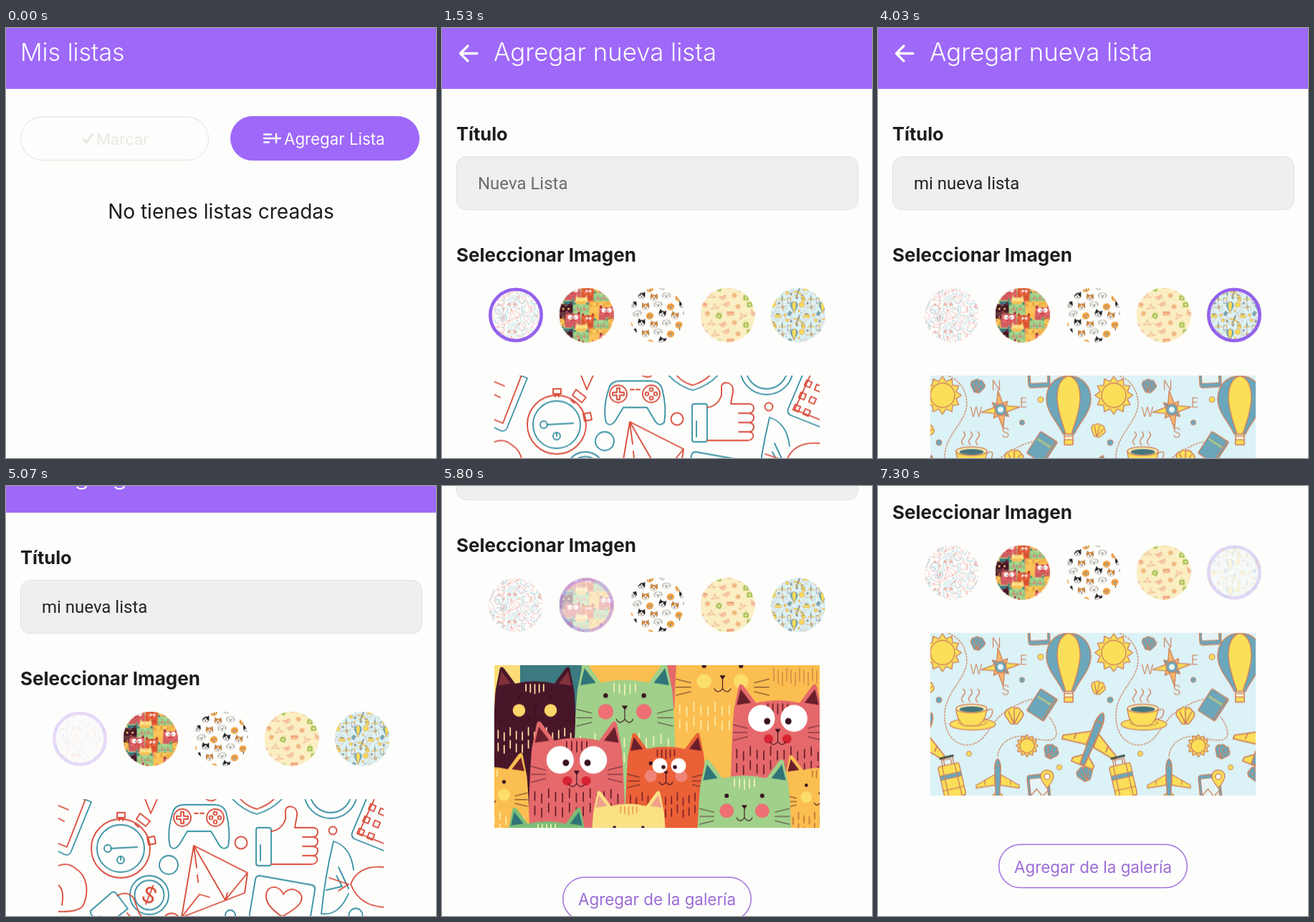
These frames come from a looping animation (600x600 px, 7.33 s). An HTML page with a canvas:

```html
<!DOCTYPE html>
<html lang="es">
<head>
<meta charset="utf-8">
<title>Mis listas</title>
<style>
html, body { margin: 0; width: 100%; height: 100%; overflow: hidden; background: #fdfdfc; }
canvas { display: block; width: 600px; height: 600px; }
</style>
</head>
<body>
<canvas id="stage" width="600" height="600"></canvas>
<script>
const LOOP = 7330, W = 454, H = 227;
const PAGE = '#fdfdfc', PURPLE = '#9e68f9', INK = '#1c1c1c';
const SANS = 'Inter, sans-serif', FIELD = 'Roboto, sans-serif';
const screen2d = document.getElementById('stage').getContext('2d');
let g = screen2d;

// ---------- helpers ----------
const clamp = v => Math.max(0, Math.min(1, v));
function paint(fill, line, w = 1.6, shape) {
  if (fill) { g.fillStyle = fill; shape ? g.fill(shape) : g.fill(); }
  if (line) { g.strokeStyle = line; g.lineWidth = w; shape ? g.stroke(shape) : g.stroke(); }
}
const path = (d, fill, line, w) => paint(fill, line, w, new Path2D(d));
function dot(x, y, r, fill, line, w) {
  g.beginPath(); g.arc(x, y, r, 0, 7); paint(fill, line, w);
}
function oval(x, y, rx, ry, fill, line, w) {
  g.beginPath(); g.ellipse(x, y, rx, ry, 0, 0, 7); paint(fill, line, w);
}
function box(x, y, w, h, r, fill, line, lw) {
  g.beginPath(); g.roundRect(x, y, w, h, r); paint(fill, line, lw);
}
function text(s, x, y, size, color, weight = 400, family = SANS, align = 'left') {
  g.font = `${weight} ${size}px ${family}`;
  g.textAlign = align;
  g.fillStyle = color;
  g.fillText(s, x, y);
}
function at(x, y, turn, draw, scale = 1) {
  g.save(); g.translate(x, y); g.rotate(turn * Math.PI / 180); g.scale(scale, scale);
  draw(); g.restore();
}

// ---------- gadgets ----------
function gadgets() {
  const O = '#d94a38', T = '#3590a2', w = 1.8;
  const o = d => path(d, null, O, w), t = d => path(d, null, T, w);
  const ring = (x, y, r, col) => dot(x, y, r, null, col, w);
  g.fillStyle = PAGE; g.fillRect(0, 0, W, H);
  // tablet, pen
  t('M30 -2L46 4L18 73Q15 80 8 77L0 73');
  o('M38 0L12 67L0 62M0 9L14 15M0 27L8 31M121 0L129 20L138 0');
  // stopwatch
  ring(87, 69, 41, O); ring(87, 69, 33, T); ring(69, 69, 5, T); ring(87, 85, 5, T);
  t('M73 69L110 67M87 80V85'); o('M82 19H93V26H82ZM85 26V30M90 26V30');
  o('M114 20L128 31L122 38L109 28ZM107 35L112 39M124 54L134 52L136 62L126 64Z');
  // controller
  t('M156 66Q151 46 160 18Q163 8 176 8H218Q230 8 234 18Q241 46 237 66Q229 74 222 60L213 45H180L171 60Q163 74 156 66Z');
  ring(173, 26, 12, O); ring(219, 26, 12, O);
  o('M171 18H175V24H181V28H175V34H171V28H165V24H171ZM190 20H195M198 20H203M206 0Q214 5 220 0');
  for (let i = 0; i < 4; i++) ring(219 + 6 * Math.cos(i * 1.57), 26 + 6 * Math.sin(i * 1.57), 2.4, O);
  // badge, globe
  t('M243 0Q258 16 277 21Q298 15 312 0'); o('M254 0Q264 11 277 14Q292 9 301 0');
  ring(380, -10, 37, T); ring(380, -10, 29, T);
  // thumb up
  box(276, 40, 21, 53, 3, null, T, w); t('M282 64V86');
  o('M297 45Q312 43 317 28V15Q319 9 327 11Q334 14 333 23L330 40H356Q363 41 362 47Q361 53 355 53H341M355 53Q363 54 362 60Q361 66 355 66H341M355 66Q363 67 362 73Q361 79 355 79H341M355 79Q363 80 361 86Q359 91 353 91H297');
  // calculator
  t('M432 -5L410 47Q408 53 414 56L454 72');
  o('M441 0L419 48L454 62');
  for (let i = 0; i < 6; i++) at(438 - (i >> 1) * 8 + (i & 1) * 14, 12 + (i >> 1) * 17 + (i & 1) * 6, 23, () => box(-4, -4, 8, 8, 0, null, O, w));
  // loose bubbles
  ring(255, 61, 8.5, O); ring(154, 92, 13, T); ring(383, 44, 5.5, O); ring(158, 172, 12.5, O);
  ring(240, 162, 7, T); ring(294, 198, 16, O); ring(415, 162, 9.5, T);
  // gem
  o('M189 65L264 103L260 131L172 165ZM189 65L233 141L264 103M233 141L236 131M172 165L197 133L211 137M189 65L193 96M194 106L195 116');
  // coin
  ring(127, 134, 27, T); ring(127, 134, 20.5, T);
  at(127, 134, 22, () => text('$', 0, 11, 31, O, 400, SANS, 'center'));
  // speech bubble with heart
  t('M281 107L354 120Q359 121 358 127L350 176Q349 181 343 180L335 197L322 176L271 167Q266 165 267 160L275 112Q276 107 281 107Z');
  o('M312 164Q288 148 290 133Q292 122 303 123Q311 125 314 133Q321 123 331 127Q342 132 339 142Q336 151 312 164Z');
  // head, hand
  o('M0 93Q14 88 24 97Q36 104 39 120Q41 134 35 148Q29 158 0 157M0 120Q9 128 5 148');
  t('M45 156L74 131Q78 128 81 132L97 153L67 177Q62 180 59 176L45 160Z'); ring(57, 167, 3, T);
  o('M82 135Q96 127 105 138L113 160Q120 166 113 171Q102 168 96 159M68 177Q82 190 100 191L134 207Q140 205 134 198L117 184L136 194Q141 192 136 185L114 166');
  // bow tie, globe edge
  t('M384 59Q372 108 367 160Q391 164 405 132M384 59Q408 66 412 99M391 95L405 125M374 127L396 122L388 107');
  o('M454 95Q418 92 408 119Q420 149 454 151M378 110L405 119L391 128');
  // crosshairs, target, star
  for (const x of [10, 464]) {
    ring(x, 203, 36, T); ring(x, 203, 27, T);
    path(`M${x} 165V195M${x} 211V230M${x - 38} 203H${x - 10}M${x + 10} 203H${x + 38}M${x - 4} 176H${x + 4}M${x - 4} 183H${x + 4}M${x - 4} 190H${x + 4}`, null, O, w);
  }
  ring(209, 231, 53, T); ring(209, 231, 39, T); ring(209, 231, 24, T);
  o('M207 229L263 181M247 193L248 181L260 173V183L268 184L258 194L247 193');
  o('M366 170L388 183L416 174L409 198L430 218L404 220L392 245L379 222L351 215L372 196Z');
  o('M54 222L74 209L118 219M77 213L86 227'); ring(75, 207, 3, O); box(121, 217, 17, 20, 2, null, T, w);
  t('M293 227V222H300V227M309 227V221H316V227M324 227V223H331');
}

// ---------- cats ----------
function cat(x0, x1, top, col, y, face, tick = '#fff0b0', ear = '#6a1f2c') {
  const w = x1 - x0, e = w * .22, m = (x0 + x1) / 2, k = w / 135;
  const X = f => x0 + f * w, Y = f => top + f * e;
  path(`M${X(-.02)} 400Q${X(0)} ${Y(3)} ${X(.04)} ${Y(1.25)}L${X(.09)} ${Y(.1)}Q${X(.11)} ${Y(-.1)} ${X(.15)} ${Y(.15)}L${X(.27)} ${Y(.9)}Q${m} ${Y(.65)} ${X(.73)} ${Y(.9)}L${X(.85)} ${Y(.15)}Q${X(.89)} ${Y(-.1)} ${X(.91)} ${Y(.1)}L${X(.96)} ${Y(1.25)}Q${X(1)} ${Y(3)} ${X(1.02)} 400Z`, col);
  for (const s of [0, 1]) {
    const F = f => X(s ? 1 - f : f);
    path(`M${F(.07)} ${Y(1)}L${F(.11)} ${Y(.25)}L${F(.22)} ${Y(.9)}Z`, ear);
  }
  let d = '';
  for (let i = -2; i < 3; i++) d += `M${m + i * 7 * k} ${Y(.95)}v${(14 - Math.abs(i) * 2) * k}`;
  for (let i = 0; i < 26; i++) {
    const u = i % 13, low = i > 12;
    d += `M${X(.07 + u * .071)} ${y + (low ? 62 : 42) * k + Math.sin(u * 2.2) * 4}v${12 * k}`;
  }
  path(d, null, tick, 1.8);
  const dark = '#3a1220';
  if (face === 'big') {
    for (const s of [-1, 1]) {
      dot(m + s * 23 * k, y - 2, 19 * k, '#fff');
      dot(m + s * 15 * k, y + 2, 4.5 * k, dark);
      dot(m + s * 13 * k, y + 27 * k, 6.5 * k, '#d62433');
    }
  } else for (const s of [-1, 1]) {
    dot(m + s * 25 * k, y + 10 * k, 10 * k, face);
    dot(m + s * 25 * k, y - 11 * k, 3 * k, dark);
  }
  const n = y + (face === 'big' ? 13 : 2) * k;
  path(`M${m - 4 * k} ${n}h${8 * k}l${-4 * k} ${6 * k}Z`, dark);
  path(`M${m} ${n + 6 * k}v${12 * k}q${-7 * k} ${8 * k} ${-11 * k} 0M${m} ${n + 18 * k}q${7 * k} ${8 * k} ${11 * k} 0`, null, dark, 1.1);
  d = '';
  for (const s of [-1, 1]) for (let i = 0; i < 3; i++)
    d += `M${m + s * 43 * k} ${y + (12 + i * 6) * k}l${s * 20 * k} ${(i - 1) * 5 * k}`;
  path(d, null, dark, .8);
}
function cats() {
  const Y = '#fbbe50', G = '#a0d08a', S = '#e5696b', pink = '#ee6f74', fur = '#6a1f2c', teal = '#2f7478';
  g.fillStyle = Y; g.fillRect(0, 0, W, H);
  g.fillStyle = '#fbdc78'; g.fillRect(0, 0, 36, 60);
  g.fillStyle = '#3a7a80'; g.fillRect(36, 0, 86, 70);
  g.fillStyle = S; g.fillRect(235, 0, 20, 60);
  let d = '';
  for (let i = 0; i < 11; i++) d += `M${390 + i * 6} ${4 + i % 3 * 3}v18`;
  path(d, null, '#d98a45', 1.6);
  cat(249, 388, -45, Y, 12, '#fbdd6c', '#fdeaa0');
  cat(-3, 116, 2, '#481629', 54, '#fbd668', '#fbe0a0', '#82313c');
  cat(110, 254, -4, G, 54, pink, '#eef2b0', teal);
  cat(329, 462, 26, S, 76, 'big', fur);
  cat(47, 183, 78, S, 134, 'big', fur);
  cat(182, 297, 94, '#ea6037', 146, '#f18478', '#84242a');
  for (const x of [231, 257]) { dot(x, 140, 10.5, '#fff'); dot(x + (x < 240 ? 5 : -5), 142, 2.8, '#3a1220'); }
  cat(-66, 50, 122, Y, 172, '#fbdd6c', '#fdeaa0');
  cat(402, 508, 125, Y, 176, '#fbdd6c', '#c97a3c');
  cat(282, 416, 131, G, 193, pink, '#eef2b0', teal);
  cat(134, 241, 175, '#fbe184', 235, pink, '#f3a050', '#f0a08a');
  cat(15, 131, 198, '#7cbd78', 250, pink, '#eef2b0', teal);
}

// ---------- dogs ----------
function dog(kind) {
  const K = '#1d1a1a', cream = '#fffdf8', fur = ['#262324', '#f0a040', cream, '#ec9238'][kind];
  if (kind === 1) {
    for (let i = 0; i < 10; i++) dot(27 * Math.cos(i * .628), 24 * Math.sin(i * .628), 12, fur);
  } else {
    for (const s of [-1, 1]) path(kind === 2
      ? `M${s * 18} -24Q${s * 50} -30 ${s * 40} 12L${s * 26} 4Z`
      : `M${s * 8} -22L${s * 31} -42L${s * 34} -4Z`, fur, K, 2);
  }
  oval(0, 0, 35, 29, fur, kind === 1 ? null : K, 2.2);
  if (kind !== 1) path('M0 -20Q8 -2 29 6Q24 29 0 29Q-24 29 -29 6Q-8 -2 0 -20Z', cream);
  else oval(0, 9, 17, 13, '#fae0b5');
  for (const s of [-1, 1]) dot(s * 13, -3, 4, K);
  oval(0, 7, 6, 4.5, K);
  path('M0 10V16Q-7 23 -11 16M0 16Q7 23 11 16', null, K, 2);
}
function dogs() {
  g.fillStyle = PAGE; g.fillRect(0, 0, W, H);
  for (let r = 0; r < 3; r++) for (let i = -1; i < 5; i++)
    at(i * 104 + 28 + r * 35, 36 + r * 76 + (i & 1 ? 9 : -9), (i * 37 + r * 23 + 60) % 40 - 20, () => dog((i * 3 + r * 2 + 8) % 4), .82);
}

// ---------- shopping ----------
function shopping() {
  const R = '#ec7a63', G = '#a3bf4c';
  const items = [
    () => { box(-26, -20, 52, 46, 5, G); path('M-12 -16V-29Q0 -42 12 -29V-16', null, G, 5); oval(0, 3, 11, 11, '#f6eec4'); },
    () => path('M-38 -24H-27L-16 16H24L34 -14H-23M-20 -3H29M-10 -14L-6 16M8 -14V16', null, R, 3.5),
    () => { box(-32, -18, 64, 36, 5, '#f7c795', R, 3); path('M-32 -7H32', null, R, 6); },
    () => { dot(0, 0, 20, '#f5d685', R, 4); dot(0, 0, 9, null, R, 3); },
    () => path('M-38 18L0 -6L38 18ZM0 -6V-14Q10 -18 5 -26Q-3 -30 -7 -22', null, R, 3.5)
  ];
  g.fillStyle = '#faeec2'; g.fillRect(0, 0, W, H);
  for (let r = 0; r < 3; r++) for (let i = -1; i < 5; i++)
    at(i * 96 + 26 + r * 33, 34 + r * 76 + (i & 1 ? 9 : -9), (i * 53 + r * 31 + 60) % 80 - 40, items[(i * 2 + r + 7) % 5], .85);
}

// ---------- travel ----------
function travel() {
  const Y = '#fbdf58', T = '#6ba6ba', O = '#cf8460', w = 1.4;
  const shape = (d, f) => path(d, f, O, w);
  const sun = r => {
    let d = '';
    for (let i = 0; i < 24; i++) {
      const a = i * Math.PI / 12, q = r * (i % 2 ? 1.16 : 1.55);
      d += `${i ? 'L' : 'M'}${q * Math.cos(a)} ${q * Math.sin(a)}`;
    }
    shape(d + 'Z', Y); dot(0, 0, r, Y, O, w);
  };
  const shell = f => {
    shape('M-4 9L-11 -1Q-12 -8 -6 -9Q-3 -13 1 -10Q6 -12 8 -7Q13 -4 10 1L4 9Z', f);
    shape('M0 9L-7 -6M0 9V-9M0 9L7 -5');
  };
  const plane = (body, wing) => {
    shape('M-4 -6L-30 9V13L-4 9ZM4 -6L30 9V13L4 9ZM-3 20L-12 27V31H12V27L3 20Z', wing);
    shape('M0 -28Q5 -24 4 -10L2.5 30H-2.5L-4 -10Q-5 -24 0 -28Z', body);
    shape('M-18 2V8M18 2V8M-3 -18H3');
  };
  const star = (f, r) => {
    for (let i = 0; i < 4; i++) at(0, 0, i * 90, () => shape(`M0 0L-5 -5L0 ${-r}L5 -5Z`, i % 2 ? f : '#f8b86c'));
  };
  const phone = () => { box(-15, -24, 30, 48, 4, T, O, w); box(-12, -19, 24, 37, 1, '#e6f4f6', O, 1); shape('M-12 4L-3 -4L4 7L12 0'); };
  g.fillStyle = '#dbf2f6'; g.fillRect(0, 0, W, H);
  for (const x of [-239, 0, 239, 478]) at(x, 0, 0, () => {
    g.save(); g.setLineDash([1.8, 2.4]);
    shape('M18 -2Q50 8 51 40C50 65 22 82 20 112C19 140 32 157 53 157C80 154 82 125 104 111C133 92 142 94 146 92');
    shape('M94 172C96 154 113 142 137 145C155 151 177 155 176 139Q173 126 166 118');
    g.restore();
    at(17, 28, 0, () => sun(17)); at(135, 158, 0, () => sun(10));
    at(66, 16, 10, () => shell(T), .9); at(117, 117, 0, () => shell(Y), 1.15); at(234, 78, 15, () => shell(Y), .9);
    at(168, 167, 25, () => shell(T), .95); at(216, 198, -20, () => shell(T));
    at(98, 48, 40, () => star(T, 15)); at(98, 48, -8, () => star(Y, 27)); dot(98, 48, 8, T, O, w); dot(98, 48, 4, '#e6f4f6');
    [['N', 92, 21], ['W', 64, 58], ['E', 130, 45], ['S', 105, 87]].forEach(([s, a, b]) => text(s, a, b, 18, O, 300, SANS, 'center'));
    at(151, -7, -3, phone); at(152, 222, -6, phone);
    shape('M163 217Q153 205 154 200Q155 192 163 192Q172 193 172 201Q171 207 163 217Z', Y); dot(163, 201, 4, '#fff', O, w);
    // balloon
    shape('M193 1C174 1 162 15 162 33C162 52 178 66 185 82H201C208 66 224 52 224 33C224 15 212 1 193 1Z', T);
    shape('M193 1C181 4 177 18 177 33C178 52 184 66 189 82H197C202 66 208 52 209 33C209 18 205 4 193 1Z', Y);
    shape('M187 82V87M199 82V87'); box(187, 85, 12, 12, 1, '#fff6d0', O, w); shape('M187 90H199V97H187Z', Y);
    // cup
    oval(59, 128, 32, 8, Y, O, w); oval(59, 126, 20, 4, Y, O, 1);
    shape('M79 109Q89 103 86 114Q83 122 74 121', null);
    shape('M36 106Q37 124 48 130H66Q77 124 79 106Z', Y); oval(57.5, 106, 21.5, 6, '#fff0b0', O, w); oval(57.5, 107, 17, 4, '#47757c');
    for (const a of [46, 56, 66]) shape(`M${a} 97q-5 -4 0 -9t0 -9`);
    // passport
    at(156, 101, 33, () => { box(-14, -18, 28, 36, 2, T, O, w); text('PASSPORT', 0, -5, 4.4, Y, 700, SANS, 'center'); shape('M11 -18V18'); });
    at(227, 147, 22, () => plane(T, Y), 1.33); at(94, 204, 0, () => plane(T, Y));
    // suitcase
    at(30, 206, -13, () => {
      shape('M-8 -22V-33H8V-22M-5 -22V-30H5V-22', null); path('M-9 -33H9', null, '#40504a', 3);
      box(-15, -22, 30, 46, 3, Y, O, w); box(-15, -9, 30, 6, 0, T, O, 1); shape('M-9 -22V24M9 -22V24M-15 12H15');
    });
    [[12, 94, 4, T], [128, 66, 3.5, T], [154, 34, 4, Y], [54, 169, 3.5, Y], [180, 188, 3.5, Y]].forEach(([a, b, r, f]) => dot(a, b, r, f, O, 1));
  });
}

// ---------- cached pictures ----------
function cache(w, h, draw) {
  const cv = document.createElement('canvas');
  cv.width = w; cv.height = h;
  g = cv.getContext('2d'); g.lineJoin = g.lineCap = 'round';
  draw();
  g = screen2d;
  return cv;
}
const pics = [gadgets, cats, dogs, shopping, travel].map(draw => ({
  wide: cache(W, H, draw),
  thumb: cache(76, 76, () => {
    g.beginPath(); g.arc(38, 38, 38, 0, 7); g.clip();
    g.scale(76 / W, 76 / W);
    for (let i = -1; i < 2; i++) {
      g.save(); g.translate(0, H / 2 + i * H);
      g.beginPath(); g.rect(0, 0, W, H); g.clip();
      draw(); g.restore();
    }
  })
}));

// ---------- timeline ----------
const taps = [[2760, 4], [5035, 0], [5685, 1], [6270, 2], [6770, 3], [7265, 4]];
const typed = 'mi nueva lista';

function selected(t) {
  let n = 0;
  for (const [when, i] of taps) if (t >= when) n = i;
  return n;
}
function touch(t, when) {
  const d = t - when;
  if (d < -120 || d > 250) return 1;
  return d < 0 ? 1 - .8 * (d + 120) / 120 : .2 + .8 * (d / 250) ** 2;
}
function scrollAt(t) {
  if (t < 5070) return 47.5 * clamp((t - 4699) / 371) ** 2;
  if (t < 5800) return 47.5 + (t - 5070) * .2555;
  return 280 - 46 * (1 - clamp((t - 5800) / 320)) ** 2;
}

// ---------- screens ----------
function header() {
  g.fillStyle = PAGE; g.fillRect(0, 0, 600, 900);
  g.fillStyle = PURPLE; g.fillRect(0, 0, 600, 85);
}
function home(t) {
  header();
  text('Mis listas', 20, 46, 34, '#fdfdfd', 300);
  const pale = '#e9e9e6';
  box(20.5, 124, 262, 60.5, 30.25, null, pale, 1.3);
  path('M108 155L112 160L121 148', null, pale, 3);
  text('Marcar', 126, 163, 22, pale);
  g.save();
  g.globalAlpha = touch(t, 420);
  box(313, 123, 264, 62, 31, PURPLE);
  path('M360 148.5H370M360 154H370M360 159.5H367M371 154H383M377 148V160', null, '#fdfdfd', 2.3);
  text('Agregar Lista', 388, 163, 22.3, '#fdfdfd');
  g.restore();
  text('No tienes listas creadas', 300, 266, 28, INK, 400, SANS, 'center');
}
function form(t) {
  header();
  path('M49 35.5H27M36 25L25.5 35.5L36 46', null, '#fdfdfd', 3.3);
  text('Agregar nueva lista', 72, 46, 34.8, '#fdfdfd', 300);
  text('Título', 20, 157, 25.5, INK, 700);
  box(20.5, 179.5, 560, 74, 13, '#eeefee', '#e2e3e2', 1);
  const n = Math.floor(clamp((t - 1600) / 900) * typed.length);
  text(n ? typed.slice(0, n) : 'Nueva Lista', 50, 225, 24, n ? '#222226' : '#6c6c6c', 400, FIELD);
  text('Seleccionar Imagen', 20, 326, 26, INK, 700);
  const now = selected(t);
  pics.forEach((p, i) => {
    const x = 103 + i * 98.5, y = 400.5;
    g.save();
    g.globalAlpha = Math.min(...taps.filter(k => k[1] === i).map(k => touch(t, k[0])), 1);
    g.drawImage(p.thumb, x - 38, y - 38);
    if (i === now) dot(x, y, 35.7, null, '#9461ee', 4.6);
    g.restore();
  });
  g.drawImage(pics[now].wide, 73, 484.5);
  box(168.7, 780.2, 262.6, 60.4, 30.2, null, '#a272dc', 1.5);
  text('Agregar de la galería', 300, 819.5, 22.4, '#9a6cd6', 400, SANS, 'center');
}
function frame() {
  const t = performance.now() % LOOP;
  g.globalAlpha = 1;
  g.lineJoin = g.lineCap = 'round';
  const enter = clamp((t - 470) / 350);
  if (enter < 1) home(t);
  if (enter > 0) {
    const ease = 1 - (1 - enter) ** 3;
    if (enter < 1) {
      const sheet = cache(600, 600, () => form(t));
      g.globalAlpha = ease;
      g.drawImage(sheet, 0, 48 * (1 - ease));
      g.globalAlpha = 1;
    } else at(0, -scrollAt(t), 0, () => form(t));
  }
  requestAnimationFrame(frame);
}
frame();
</script>
</body>
</html>
```
